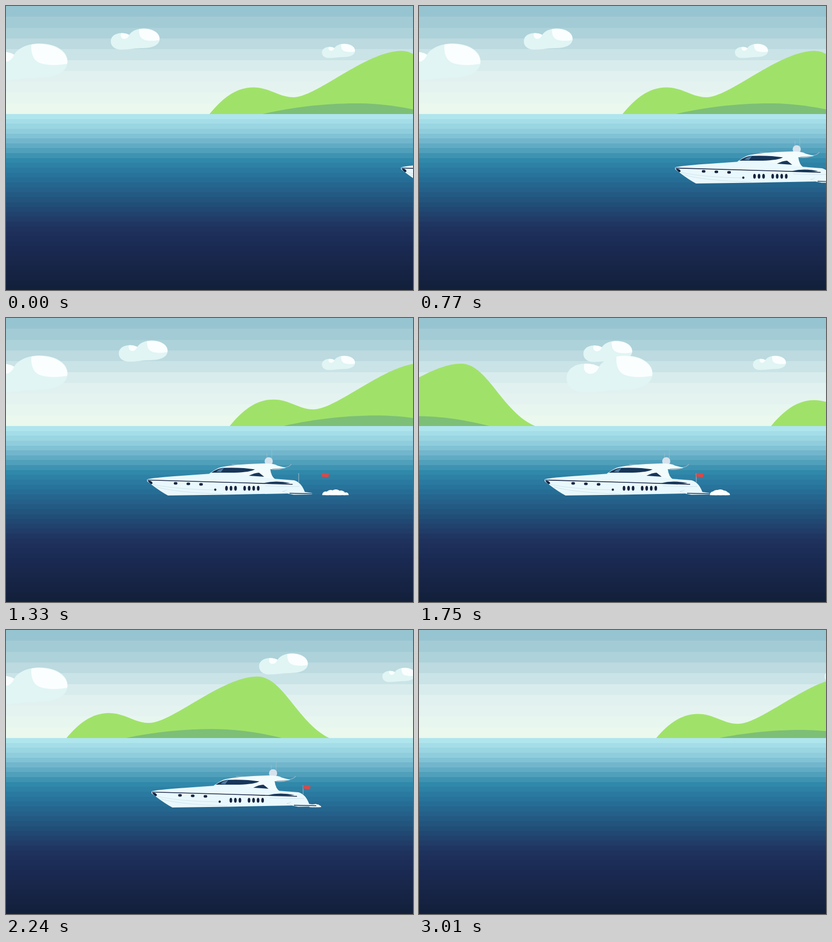
These frames come from a looping animation (800 by 560 pixels, 3080 ms). An HTML page:

```html
<!DOCTYPE html>
<html lang="en">
<head>
<meta charset="utf-8">
<title>Yacht</title>
<style>
  html, body { margin: 0; width: 100%; height: 100%; overflow: hidden; }
  svg { display: block; width: 800px; height: 560px; }
</style>
</head>
<body>
<svg viewBox="0 0 800 560" xmlns="http://www.w3.org/2000/svg">
  <defs>
    <g id="cloud">
      <path fill="#e0f5f4" d="M0 44C0 27 16 16 36 16C48 16 56 18 64 22C72 8 92 0 115 0C146 0 169 15 169 35C169 53 153 62 133 66C116 69 96 67 78 70C62 72 51 73 36 73C13 73 0 61 0 44Z"/>
      <path fill="#fbfeff" d="M98 2Q115-2 137 4C158 10 171 24 168 40C145 44 122 43 110 36C99 29 97 14 98 2Z"/>
      <path fill="#fbfeff" d="M35 16Q51 15 64 22Q58 37 45 36Q31 33 35 16Z"/>
    </g>
    <g id="island">
      <path fill="#a0e269" d="M-6 217C22 181 50 160.5 83 160.5C115 160.5 133 180 162 180C208 180 305 88.5 375 88.5C430 88.5 458 195 533 216V230H-6Z"/>
      <path fill="#7dbf76" d="M98 214C150 201 220 192 285 192C345 192 395 202 440 214V230H98Z"/>
    </g>
    <clipPath id="waterline"><rect x="-800" y="300" width="2800" height="49.3"/></clipPath>
  </defs>

  <g id="sky"></g>
  <use id="smallCloud" href="#cloud"/>
  <use id="midCloud" href="#cloud"/>
  <use id="bigCloud" href="#cloud"/>
  <use id="islandA" href="#island"/>
  <use id="islandB" href="#island"/>
  <g id="sea"></g>

  <g id="wake" fill="#fafeff" clip-path="url(#waterline)"></g>
  <g id="boat">
    <g fill="none" stroke="#9fbac6" stroke-width="1.100">
      <path d="M235.500 266V276M245 258V278" stroke-opacity=".8"/>
      <path d="M166 288.500L186 290M268 295Q280 294 283.500 288"/>
      <path d="M298 306V324"/>
    </g>
    <circle cx="239" cy="282.500" r="8" fill="#d6e2ec"/>
    <path fill="#e9f8fc" d="M0 318.500Q7 315 68 311L125 307L193 306L249 317L289 320Q303 324 310 343L324 345V348L288 348.500L276 346L150 348.500L41 350Q26 342 8 328L0 322Z"/>
    <path fill="#f2fcfd" d="M122 307Q137 296 146 294Q173 288.500 223 287Q248 286 256 291L273 295.500Q258 299 242 298Q244 313 252 318Q224 313 193 309Z"/>
    <path fill="#9fb5c2" d="M246 297L270 296Q258 301 246 299Z"/>
    <path fill="#17365a" d="M126 305Q137 297 148 295.500Q185 294 212 298.500Q203 304 172 305Z"/>
    <path fill="#4b7ba3" d="M136 303Q142 297 151 295.700L145 304Z"/>
    <path fill="#17365a" d="M200 311Q212 305 220 305L230 313Z"/>
    <path fill="#17365a" d="M229 325.500Q253 319.500 281 325.500Q269 328 229 325.500Z"/>
    <path fill="none" stroke="#c7dde7" stroke-width=".8" d="M10 328Q58 338 135 339M18 333Q55 344 150 347M232 331Q272 333 300 332M266 342L275 339M266 342L276 345"/>
    <path fill="none" stroke="#1c2748" stroke-width="1.700" d="M1 319.500Q110 322.500 190 325T286 328"/>
    <path fill="none" stroke="#1c2748" stroke-width="1.300" d="M280 345.500L324 346.500"/>
    <path fill="#152340" d="M1 321Q9 320 11 326L8 328Q4 325 1 321Z"/>
    <g id="windows" fill="#152340"><circle cx="134" cy="338.500" r="2.200"/></g>
  </g>
  <path id="flag" fill="#d54a4b" d="M0 306.500Q4 305 8 306T14.500 306L13.500 313.500Q9 315 6 313.500T0 313.500Z"/>
</svg>

<script>
const LOOP = 3080, STEP = 70;
const $ = id => document.getElementById(id);

function add(parent, tag, attrs) {
  const el = document.createElementNS('http://www.w3.org/2000/svg', tag);
  for (const key in attrs) el.setAttribute(key, attrs[key]);
  return parent.appendChild(el);
}

const channels = hex => [1, 3, 5].map(i => parseInt(hex.slice(i, i + 2), 16));

function colorAt(stops, y) {
  const i = Math.max(1, stops.findIndex(s => s[0] >= y));
  const [y0, c0] = stops[i - 1], [y1, c1] = stops[i];
  const to = channels(c1), u = (y - y0) / (y1 - y0);
  return `rgb(${channels(c0).map((c, n) => Math.round(c + (to[n] - c) * u))})`;
}

// Paints a vertical gradient as equal flat bands.
function bands(parent, stops, count) {
  const top = stops[0][0], size = (stops[stops.length - 1][0] - top) / count;
  for (let i = 0; i < count; i++) {
    const y = Math.round(top + i * size), end = Math.round(top + (i + 1) * size);
    add(parent, 'rect', { y, width: 800, height: end - y, fill: colorAt(stops, (y + end) / 2) });
  }
}

bands($('sky'), [[0, '#92c0cf'], [50, '#abd1d9'], [85, '#c3dee2'], [128, '#dff0f0'], [213, '#ecf9ee']], 10);
bands($('sea'), [[213, '#b4e9f0'], [250, '#8ccadb'], [304, '#3088aa'], [330, '#27759d'],
  [390, '#214f78'], [435, '#20335f'], [480, '#192950'], [560, '#131f3a']], 36);

for (let i = 0; i < 3; i++)
  add($('windows'), 'rect', { x: 52.5 + 25 * i, y: 323.5 + i, width: 7, height: 5, rx: 2 });
for (let i = 0; i < 7; i++)
  add($('windows'), 'ellipse', { cx: 156 + 8.9 * i + (i > 2 ? 9 : 0), cy: 335.8, rx: 2.6, ry: 4.8 });

const puffs = Array.from({ length: 5 }, () => add($('wake'), 'circle', { cy: 349 }));

const progress = (t, start, length) => Math.min(1, Math.max(0, (t - start) / length));
const smooth = (t, start, length) => {
  const u = progress(t, start, length);
  return u * u * (3 - 2 * u);
};

function place(id, x, y = 0, scale = 1) {
  $(id).setAttribute('transform', `translate(${x} ${y}) scale(${scale})`);
}

// Arrives, drifts back a little, then speeds away.
function boatX(t) {
  return 779 - 532 * smooth(t, -66, 1633) + 39 * smooth(t, 1750, 450)
    - 700 * progress(t, 2160, 850) ** 5;
}

// The near cloud crosses the sky twice at a steady speed.
function bigCloudX(t) {
  const start = 1522, period = 718, time = Math.max(0, t - start);
  return -48 + 1.483 * (time < 2 * period ? time % period : period);
}

// Foam swells away from the stern and back.
function drawWake(time) {
  const t = Math.max(1330, time);
  const swell = Math.cos(2 * Math.PI * (t - 1330) / 1650);
  const size = 11 - 5 * smooth(t, 1750, 490);
  puffs.forEach((puff, i) => {
    puff.setAttribute('cx', 346 + 25 * swell + (i / 4 - .5) * (28 + 12 * swell));
    puff.setAttribute('r', size * (.35 + .65 * Math.sin(Math.PI * (i + .7) / 5)));
  });
}

function render(t) {
  const drift = smooth(t, 1117, 1825);
  const land = 403 + 1048 * drift;
  place('islandA', land, 5 * drift);
  place('islandB', land - 986, 5 * drift);

  place('smallCloud', 621 + 176 * smooth(t, 1324, 1480), 74.5, .385);
  place('midCloud', 206 + 647 * progress(t, 1190, 1820) ** 1.45, 44.5 + 2.7 * drift, .568);
  place('bigCloud', bigCloudX(t), 74);

  const x = boatX(t);
  place('boat', x);
  place('wake', x);
  place('flag', x + 298 + 64 * (1 - smooth(t, 1150, 500)));
  drawWake(t);
}

const began = performance.now();
function tick() {
  const t = (performance.now() - began) % LOOP;
  render(Math.floor(t / STEP) * STEP);
  requestAnimationFrame(tick);
}
tick();
</script>
</body>
</html>
```
